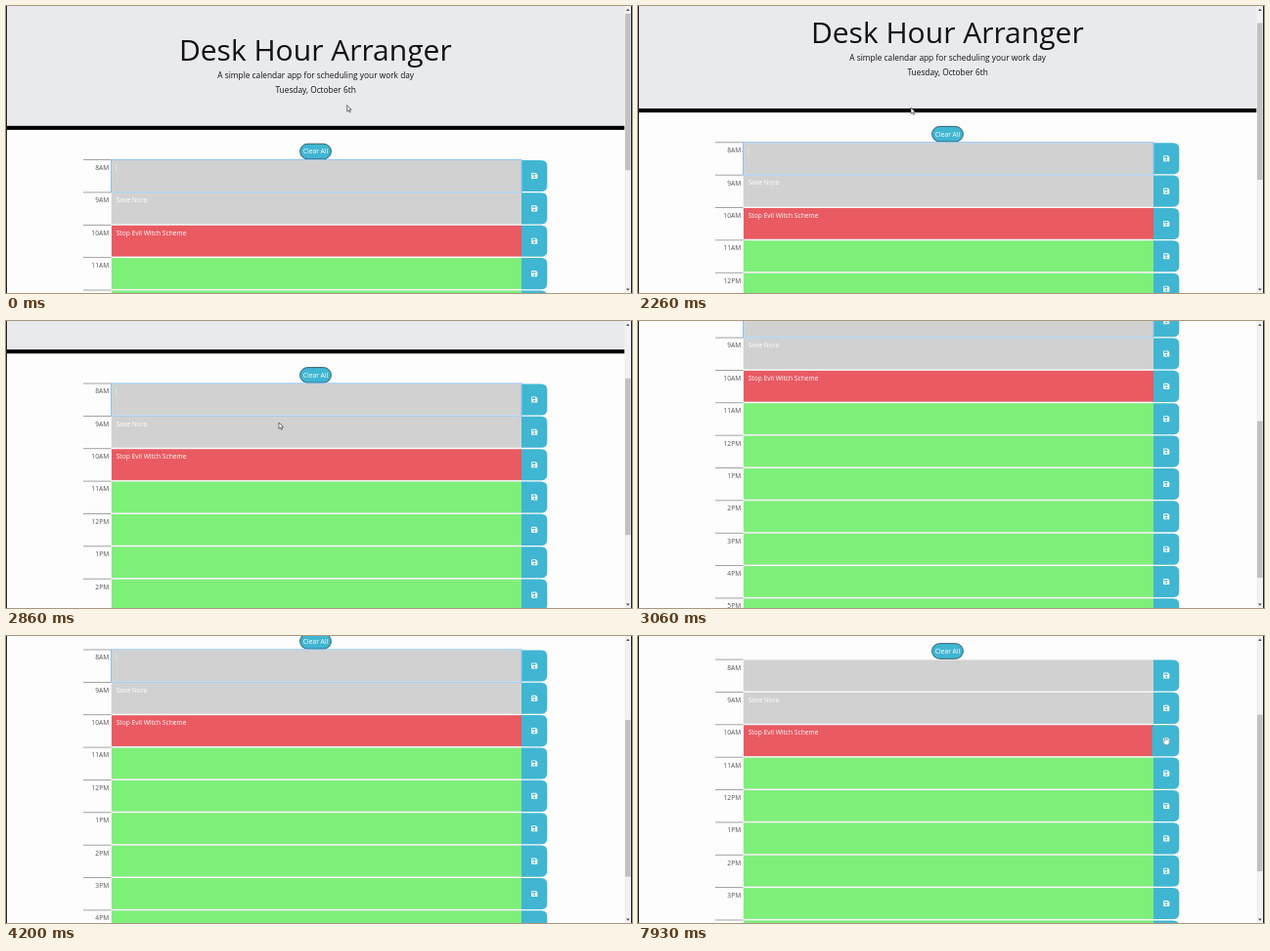
An HTML page for the animation above (8 s loop, 640 by 294 pixels).

```html
<!DOCTYPE html>
<html lang="en">
<head>
<meta charset="utf-8">
<style>
  html, body { margin: 0; width: 100%; height: 100%; overflow: hidden; background: #fdfdfd; }
  svg { display: block; width: 640px; height: 294px; font: 6.67px "Open Sans", sans-serif; }
  .center { text-anchor: middle; }
  .lead { font-size: 8.33px; }
  .label { text-anchor: end; fill: #555; }
  .button { fill: #40b6d2; }
  .white { fill: #fff; }
</style>
</head>
<body>
<svg viewBox="0 0 640 294">
  <g id="page">
    <rect width="633" height="123" fill="#e9eaee"/>
    <rect y="122.8" width="632.5" height="4.1"/>
    <g class="center" fill="#111">
      <text x="316.3" y="56" font-size="30">Desk Hour Arranger</text>
      <text class="lead" x="316.7" y="73.5">A simple calendar app for scheduling your work day</text>
      <text class="lead" x="316.6" y="88.6">Tuesday, October 6th</text>
    </g>
    <rect class="button" x="300.6" y="141.2" width="31.8" height="15.6" rx="7.8" stroke="#285560" stroke-width=".9"/>
    <text class="center white" x="316.5" y="151.4">Clear All</text>
    <g id="rows"></g>
    <g id="focus">
      <rect x="107.5" y="157.5" width="419.5" height="33.3" fill="none" stroke="#8fc1f2"/>
      <rect x="112.4" y="162" width=".6" height="7.5" fill="#e8e8e8"/>
    </g>
  </g>
  <rect width="1" height="294" fill="#222"/>
  <rect x="632.5" width="6.5" height="294" fill="#f1f1f1"/>
  <rect id="thumb" x="633" width="5.5" height="160.5" fill="#c1c1c1"/>
  <path d="M634 5l1.8-2.2 1.8 2.2zM634 289.5l1.8 2.2 1.8-2.2z" fill="#505050"/>
  <rect x="639" width="1" height="294" fill="#222"/>
  <path id="arrow" d="M0 0V6.4L1.5 5.1L2.5 7.4L3.6 6.9L2.6 4.7H4.6Z" fill="#fff" stroke="#222" stroke-width=".6"/>
  <path id="hand" d="M-.6 .6Q0-.4 .6 .6V3L3.2 3.6Q3.8 3.8 3.7 5L3 8.4H-.6L-2.5 5.4Q-2.5 4.4-.6 5.2Z" fill="#fff" stroke="#555" stroke-width=".4"/>
</svg>
<script>
const LOOP = 8000, TOP = 157.5, ROW = 33.36, ROWS = 10;
const $ = id => document.getElementById(id);
const tasks = { 1: 'Save Nora', 2: 'Stop Evil Witch Scheme' };
const hourLabel = h => (h > 12 ? h - 12 : h) + (h < 12 ? 'AM' : 'PM');
const fillFor = i => i < 2 ? '#d1d1d1' : i === 2 ? '#e95a62' : '#7eef79';

$('rows').innerHTML = Array.from({ length: ROWS }, (_, i) => `
  <g transform="translate(0 ${TOP + i * ROW})">
    <rect x="79" y="-.3" width="28.5" height=".8" fill="#8d8d8d"/>
    <text class="label" x="105.2" y="10.5">${hourLabel(8 + i)}</text>
    <rect x="107.5" y=".3" width="420" height="32.6" fill="#e8eae8"/>
    <rect x="108" y=".6" width="419" height="31.7" fill="${fillFor(i)}"/>
    <text class="white" x="112.7" y="10.4">${tasks[i] || ''}</text>
    <path class="button save"/>
    <path class="white" fill-rule="evenodd" d="M537.8 13.5h4l1.5 1.5v4q0 .6-.6.6h-4.9q-.6 0-.6-.6v-4.9q0-.6.6-.6zM538.1 14.4v1.6h3.3v-1.6zM540.2 16.8a1 1 0 1 0 .01 0z"/>
  </g>`).join('');
const saves = [...document.querySelectorAll('.save')];

const ramp = (t, from, to) => Math.min(1, Math.max(0, (t - from) / (to - from)));
const easeOut = u => 1 - (1 - u) ** 3;
const smooth = u => u * u * (3 - 2 * u);
const arc = u => Math.sin(Math.PI * u);

// A steady scroll, a quick finish to the bottom, then a glide back up.
const scrollAt = t => 102.3 * ramp(t, 2120, 2930) + 109.3 * ramp(t, 2930, 3130)
  - 78.1 * easeOut(ramp(t, 3860, 4550));

// Three moves: drift left, up to the corner, across to the save button.
function pointerAt(t) {
  const drift = smooth(ramp(t, 130, 1730));
  const corner = smooth(ramp(t, 5400, 5930));
  const save = smooth(ramp(t, 6330, 7750));
  return [
    348.6 - 69.6 * drift - 196.2 * corner - 80 * arc(corner) + 456.7 * save,
    101.5 + 2.5 * drift - 20 * arc(drift) - 101.4 * corner + 100.4 * save
  ];
}

function draw(t) {
  const scroll = scrollAt(t), [x, y] = pointerAt(t);
  const row = Math.floor((y + scroll - TOP) / ROW);
  const inRows = t > 2930 && row >= 0 && row < ROWS;
  const onSave = inRows && x >= 527 && x <= 553;
  const onField = inRows && x >= 108 && x < 527;

  $('page').setAttribute('transform', `translate(0 ${-scroll})`);
  $('thumb').setAttribute('y', 7.8 + scroll * .545);
  $('focus').style.display = t < 7800 ? '' : 'none';
  saves.forEach((save, i) => {
    const left = onSave && i === row ? 525.5 : 527;
    save.setAttribute('d', `M${left} .5H547q6.3 0 6.3 6.3V26.3q0 6.3-6.3 6.3H${left}z`);
  });
  for (const [id, shown] of [['arrow', !onSave && !onField], ['hand', onSave]]) {
    $(id).style.display = shown ? '' : 'none';
    $(id).setAttribute('transform', `translate(${x} ${y})`);
  }
}

const start = performance.now();
function tick() {
  draw((performance.now() - start) % LOOP);
  requestAnimationFrame(tick);
}
tick();
</script>
</body>
</html>
```
